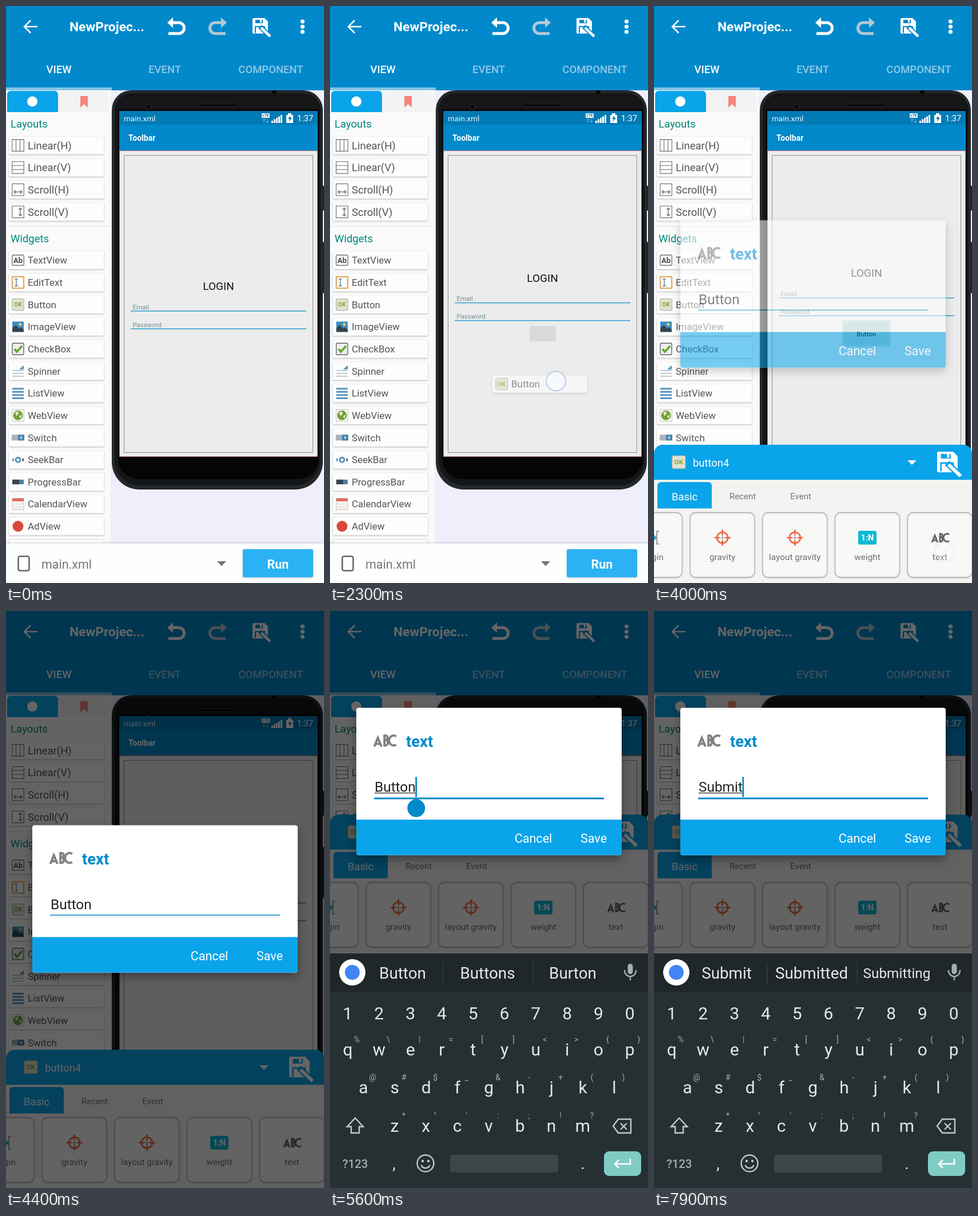
These frames come from a looping animation (556 by 1006 pixels, 8 s). An HTML page with a canvas:

```html
<!DOCTYPE html>
<html lang="en">
<head>
<meta charset="utf-8">
<title>App builder</title>
<style>
html, body { margin: 0; width: 100%; height: 100%; overflow: hidden; background: #fff; }
canvas { display: block; width: 100%; height: 100%; }
</style>
</head>
<body>
<canvas id="stage" width="556" height="1006"></canvas>
<script>
const W = 556, H = 1006, LOOP = 8000, STEP = 100;
const screen2d = document.getElementById('stage').getContext('2d');
const layer = Object.assign(document.createElement('canvas'), { width: W, height: H });
const layer2d = layer.getContext('2d');
let g = screen2d;
const BLUE = '#0189cb', SKY = '#09a4ea', GREY = '#757575';

const clamp = v => Math.max(0, Math.min(1, v));
const span = (t, from, ms) => clamp((t - from) / ms);
const easeOut = p => 1 - (1 - p) ** 2;
const easeInOut = p => p * p * (3 - 2 * p);
const mix = (a, b, p) => a + (b - a) * p;

function box(x, y, w, h, fill, r = 0, stroke, lw = 1) {
  g.beginPath();
  g.roundRect(x, y, w, h, r);
  paint(fill, stroke, lw);
}
function disc(x, y, r, fill, stroke, lw = 1) {
  g.beginPath();
  g.arc(x, y, r, 0, Math.PI * 2);
  paint(fill, stroke, lw);
}
function shape(d, fill, stroke, lw = 1, x = 0, y = 0, k = 1) {
  g.save();
  g.translate(x, y);
  g.scale(k, k);
  const p = new Path2D(d);
  if (fill) { g.fillStyle = fill; g.fill(p); }
  if (stroke) { g.strokeStyle = stroke; g.lineWidth = lw; g.stroke(p); }
  g.restore();
}
function paint(fill, stroke, lw) {
  if (fill) { g.fillStyle = fill; g.fill(); }
  if (stroke) { g.strokeStyle = stroke; g.lineWidth = lw; g.stroke(); }
}
// y is the middle of the capitals
function text(s, x, y, size, color, align = 'left', weight = 400) {
  g.font = `${weight} ${size}px Roboto, sans-serif`;
  g.textAlign = align;
  g.fillStyle = color;
  g.fillText(s, x, y + size * 0.355);
  return g.measureText(s).width;
}
function shadow(color, blur, dy) {
  g.shadowColor = color;
  g.shadowBlur = blur;
  g.shadowOffsetY = dy;
}
// Draws a group as a whole, then blends it in with one opacity
function faded(alpha, draw) {
  if (alpha <= 0) return;
  g = layer2d;
  g.clearRect(0, 0, W, H);
  draw();
  g = screen2d;
  g.globalAlpha = alpha;
  g.drawImage(layer, 0, 0);
  g.globalAlpha = 1;
}
function touch(x, y, alpha, r = 17) {
  faded(alpha, () => disc(x, y, r, '#f8faff', '#b4c6ea', 2));
}

function abc(x, y, k, color) {
  shape('M1.5 23L8 7L14.5 23M4 18H12M20 1V23M20 3H22C27 3 27 11 22 11H20M22 11C27.5 11 27.5 21 22 21H20M41.5 4.5A8.5 9 0 1 0 41.5 19.5', null, color, 4, x, y, k);
}
function floppy(x, y, k, back) {
  shape('M2 0H21L27 6V27H2Q0 27 0 25V2Q0 0 2 0Z', '#fff', null, 1, x, y, k);
  shape('M5 3H18V9H5Z', back, null, 1, x, y, k);
  shape('M13 3H16V8H13Z', '#fff', null, 1, x, y, k);
  shape('M5 26V15H21V26', null, back, 2, x, y, k);
  shape('M13 15L31 32', null, back, 8, x, y, k);
  shape('M15 17L31 32', null, '#fff', 4.5, x, y, k);
}
function curlArrow(x, dir, color) {
  g.save();
  g.translate(x, 0);
  g.scale(dir, 1);
  shape('M-8 29H5A9.5 9.5 0 0 1 5 48H-13', null, color, 5);
  shape('M-15 29L-5 20V38Z', color);
  g.restore();
}

function header() {
  box(0, 0, W, 147, BLUE);
  shape('M55 36H33M43 25L32 36L43 47', null, '#fff', 2.6);
  text('NewProjec...', 111, 36, 22.8, '#fff', 'left', 700);
  curlArrow(297, 1, '#fff');
  curlArrow(371, -1, '#b5c9d4');
  floppy(431, 21, 1, BLUE);
  for (const y of [27, 36, 45]) disc(518.5, y, 3.6, '#fff');
  text('VIEW', 92.5, 110, 18.5, '#fff', 'center', 500);
  text('EVENT', 277.5, 110, 18.5, '#8fc8e6', 'center', 500);
  text('COMPONENT', 463, 110, 18.5, '#8fc8e6', 'center', 500);
  box(0, 142, 185, 5, '#83c5e6');
}

// Each icon is drawn in a 22 px square
const frame = () => box(0.7, 0.7, 20.6, 20.6, '#fff', 0, '#888', 1.4);
const ICONS = {
  'Linear(H)': () => { frame(); shape('M7.5 1V21M14.5 1V21', null, '#888', 1.4); },
  'Linear(V)': () => { frame(); shape('M1 7.5H21M1 14.5H21', null, '#888', 1.4); },
  'Scroll(H)': () => { frame(); shape('M4 15H18M7 12L4 15L7 18M15 12L18 15L15 18', null, '#777', 1.5); },
  'Scroll(V)': () => { frame(); shape('M15 4V18M12 7L15 4L18 7M12 15L15 18L18 15', null, '#777', 1.5); },
  TextView: () => { box(0.7, 2, 20.6, 18, '#fafafa', 2, '#777', 1.4); text('Ab', 11, 11, 13, '#333', 'center', 500); },
  EditText: () => { box(1, 1, 20, 20, '#fff', 0, '#e3b06c', 2.5); shape('M8 5V17M5 5H11M5 17H11', null, '#5b87ad', 1.5); },
  Button: () => { box(0.7, 1, 20.6, 20, '#dfe4d2', 2, '#aeb4a3', 1.2); text('OK', 11, 11, 10.5, '#8aa43a', 'center', 700); },
  ImageView: () => { box(1, 2, 20, 18, '#3d8fc0'); disc(15, 7, 2.5, '#f5d04c'); shape('M1 20V13L7 8L13 14L16 12L21 16V20Z', '#34444e'); },
  CheckBox: () => { box(1, 1, 20, 20, '#eee', 2, '#777', 1.6); shape('M5 11L9 16L18 6', null, '#58a51e', 3.5); },
  Spinner: () => { shape('M1 10H21M1 15H21M1 20H21', null, '#a9b6bf', 1.6); shape('M21 1V8H13Z', '#4b93c3'); },
  ListView: () => shape('M1 3H21M1 8.5H21M1 14H21M1 19.5H21', null, '#5593bd', 3),
  WebView: () => { box(0.7, 0.7, 20.6, 20.6, '#fafafa', 1, '#bbb'); disc(11, 11, 8.5, '#74a238'); shape('M6 6L11 4L12 9L8 12ZM13 12L18 10L15 17Z', '#e5efcf'); },
  Switch: () => { box(0, 6, 22, 10, '#a8b2b8'); box(11, 6, 11, 10, '#4a86ad'); box(15.5, 9, 2, 4, '#fff'); },
  SeekBar: () => { disc(11, 11, 4, '#fff', '#5593bd', 3); box(1, 8.5, 2.5, 5, '#5593bd'); box(18.5, 8.5, 2.5, 5, '#555'); },
  ProgressBar: () => { box(1, 7, 20, 8, '#4d80a5'); box(1, 7, 12, 8, '#37474f'); },
  CalendarView: () => { box(1, 1, 20, 20, '#f6f3f0', 0, '#c9bdb8'); box(1, 1, 20, 5, '#e2695d'); shape('M4 11H18M4 16H18', null, '#ded6d2', 1); },
  AdView: () => disc(11, 11, 9.5, '#d8483b')
};
const NAMES = Object.keys(ICONS);

function icon(name, x, y, k = 1) {
  g.save();
  g.translate(x, y);
  g.scale(k, k);
  ICONS[name]();
  g.restore();
}
function paletteItem(name, x, y, size = 17) {
  g.save();
  shadow('rgba(0,0,0,.28)', 3, 1);
  box(x, y - 15.5, 166, 31, '#fdfdfd', 1);
  g.restore();
  icon(name, x + 5, y - 11);
  text(name, x + 33, y, size, '#555');
}
function palette() {
  box(0, 147, 183, 790, '#f9faf9');
  box(2, 148, 89, 37, SKY, [6, 6, 0, 0]);
  disc(46, 166.5, 9, '#fff');
  box(93, 149, 87, 36, '#f2f3f2', [6, 6, 0, 0]);
  shape('M130 157H143V177L136.5 171L130 177Z', '#f5857d');
  text('Layouts', 8, 205, 18.5, '#00897b');
  text('Widgets', 8, 405, 18.5, '#00897b');
  box(0, 384, 183, 1, '#e0e0e0');
  NAMES.forEach((name, i) => {
    if (i < 4) paletteItem(name, 5, 243 + i * 38.65, 18.5);
    else paletteItem(name, 5, 443.3 + (i - 4) * 38.65);
  });
  box(5, 930, 166, 10, '#fdfdfd', 1, '#ddd');
}

function phone(state) {
  box(183, 147, W - 183, 790, '#efeefb');
  box(550, 313, 6, 44, '#222', 2);
  box(550, 411, 6, 90, '#222', 2);
  box(185, 147, 369, 696, '#24282a', [34, 34, 48, 48]);
  box(190, 152, 360, 684, '#141617', [30, 30, 44, 44]);
  box(196, 180, 351, 645, '#050505', [0, 0, 36, 36]);
  box(465, 147, 8, 5, '#0a0a0a');
  disc(249, 176, 5, '#0a0a0a', '#3c3c3c');
  box(334, 171, 73, 4, '#050505', 2, '#333', 0.8);
  box(198, 183, 347, 24, '#027ab4');
  text('main.xml', 206, 196, 13.5, '#e8f4fa');
  box(447, 187, 14, 8, '#fff', 1);
  text('LTE', 454, 191, 7, '#027ab4', 'center', 700);
  shape('M451 203V197M449 199L451 197L453 199M457 197V203M455 201L457 203L459 201', null, '#8ec1dc', 1);
  for (let i = 0; i < 5; i++) box(464 + i * 4, 200 - i * 2.5, 3, 4 + i * 2.5, '#fff');
  shape('M490 190H493V187H499V190H502V204H490Z', '#fff');
  shape('M497 191L493 197H496L495 202L500 195H497Z', '#027ab4');
  text('1:37', 509, 196, 14.6, '#fff');
  box(198, 207, 347, 45, BLUE);
  text('Toolbar', 214, 230, 14, '#fff', 'left', 700);
  box(198, 252, 347, 534, '#ebeceb');
  box(198.5, 252.5, 346, 533, null, 0, '#cc7f7d');
  box(206.5, 260.5, 330, 518, null, 0, '#8f9191');

  const y = 488.5 - state.lift;
  text('LOGIN', 371.5, y, 19, '#111', 'center');
  [['Email', 36], ['Password', 67]].forEach(([label, dy]) => {
    text(label, 221.5, y + dy, 11.4, '#6f8b96');
    box(218, y + dy + 6.5, 307, 1.5, '#2b9fce');
  });
  if (state.slot) box(349, 557.5, 46, 27, '#d9dada', 1);
  if (state.button) {
    box(329, 548, 85, 46, '#b4d6d6');
    box(333, 552, 77, 38, '#abcdcd', 1);
    text('Button', 371.5, 571.5, 11.6, '#111', 'center', 500);
  }
}

function footer() {
  g.save();
  shadow('rgba(0,0,0,.2)', 3, -1);
  box(0, 937, W, 70, '#fdfefe');
  g.restore();
  box(21.5, 959.5, 19, 25, null, 3, '#666', 2.6);
  text('main.xml', 62, 973, 21.5, GREY);
  shape('M369 968H385L377 976.5Z', GREY);
  g.save();
  shadow('rgba(0,0,0,.25)', 3, 1);
  box(414, 947, 123, 49, '#2bb2f4', 3);
  g.restore();
  text('Run', 475.5, 973, 21.5, '#fff', 'center', 700);
}

function target(x, y) {
  disc(x, y, 9.5, null, '#ee6644', 2.6);
  shape('M-14 0H14M0-14V14', null, '#9a8a86', 1.2, x, y);
  shape('M-14 0H-5M5 0H14M0-14V-5M0 5V14', null, '#ee6644', 2.6, x, y);
}
function panel(y) {
  box(0, y + 40, W, 205, '#f3f4f2');
  box(0, y, W, 61, SKY, [15, 15, 0, 0]);
  icon('Button', 31, y + 18, 1.12);
  text('button4', 68, y + 31, 18.4, '#fff');
  shape('M443 27H459L451 35Z', '#fff', null, 1, 0, y);
  floppy(495, y + 12, 1.33, SKY);
  box(6, y + 65, 95, 46, SKY, [6, 6, 0, 0]);
  text('Basic', 53.5, y + 90, 18.4, '#fff', 'center');
  text('Recent', 155, y + 90, 15, GREY, 'center');
  text('Event', 256.5, y + 90, 15, GREY, 'center');
  ['margin', 'gravity', 'layout gravity', 'weight', 'text'].forEach((label, i) => {
    const x = -63.7 + i * 126.75;
    g.save();
    shadow('rgba(0,0,0,.15)', 2, 1);
    box(x, y + 118, 113, 113, '#f8f9f7', 10, '#b4b5b4', 1.3);
    g.restore();
    text(label, x + 56.5, y + 195.5, 15.4, '#6f6f6f', 'center');
  });
  shape('M-6 162H0M-3 156L3 162L-3 168', null, '#0aa3e8', 3, 0, y);
  shape('M9 151H5V173H9', null, '#999', 2, 0, y);
  target(119.7, y + 162);
  target(246.4, y + 162);
  box(357, y + 150, 32, 24, '#0bb8d4', 3);
  text('1:N', 373, y + 162, 14.5, '#fff', 'center', 700);
  abc(485, y + 153, 0.75, '#666');
}

function dialog(y, field) {
  g.save();
  shadow('rgba(0,0,0,.35)', 16, 7);
  box(46, y, 464, 257, '#fff', 4);
  g.restore();
  abc(76, y + 45.5, 0.96, '#808080');
  text('text', 133, y + 58.5, 27.3, BLUE, 'left', 700);
  const w = text(field.value, 78, y + 138, 24.4, '#222');
  if (field.focus) {
    if (field.value) box(78, y + 148, w, 1.3, '#222');
    box(77, y + 156.5, 402, 3, BLUE);
    box(77.5 + w, y + 120.5, 2.8, 35, BLUE);
  } else {
    box(77, y + 156, 402, 1.6, BLUE);
  }
  box(46, y + 195, 464, 62, SKY, [0, 0, 4, 4]);
  text('Cancel', 355.5, y + 227.5, 21.6, '#fff', 'center');
  text('Save', 461, y + 227.5, 21.6, '#fff', 'center');
  if (field.handle) {
    const x = 79 + w;
    disc(x, y + 175, 15.5, BLUE);
    shape('M0 156L11 165H-11Z', BLUE, null, 1, x, y);
  }
}

const ROWS = [
  { y: 764, x: 31, keys: 'qwertyuiop', alt: '%\\|=[]<>{}' },
  { y: 830, x: 58.5, keys: 'asdfghjkl', alt: '@#$_&-+()' },
  { y: 897, x: 113, keys: 'zxcvbnm', alt: '*"\':;!?' }
];
const PITCH = 54.8, KEY_SIZE = 30;
const WORDS = {
  S: 'S So She', Su: 'Su Sure Sunday', Sub: 'Sub Subject Subs', Subm: 'Subm Submit Submitted',
  Submi: 'Submi Submit Submission', Submit: 'Submit Submitted Submitting'
};

function keyPos(ch) {
  const row = ROWS.find(r => r.keys.includes(ch));
  return [row.x + row.keys.indexOf(ch) * PITCH, row.y];
}
function keyboard(dy, caps, value) {
  const ink = '#e4e8e8', dim = '#a5adb0';
  g.save();
  g.translate(0, dy);
  box(0, 597, W, 410, '#253033');
  box(0, 597, W, 67, '#1f2729');
  disc(39, 630, 23, '#fff');
  disc(39, 630, 13, '#4285f4');
  (WORDS[value] || 'Button Buttons Burton').split(' ').forEach((word, i) => {
    text(word, [127, 275.5, 424.5][i], 631, word.length > 9 ? 24.4 : 27.8, ink, 'center');
  });
  box(197, 612, 1, 38, '#3d474b');
  box(355, 612, 1, 38, '#3d474b');
  box(520.5, 615, 9, 18, dim, 4.5);
  shape('M515 626C515 641 535 641 535 626M525 637V644', null, dim, 2.4);

  [...(caps ? '!@#$%^&*()' : '1234567890')].forEach((ch, i) =>
    text(ch, 31 + i * PITCH, 701, KEY_SIZE, ink, 'center'));
  for (const row of ROWS) {
    [...row.keys].forEach((ch, i) => {
      const x = row.x + i * PITCH;
      text(caps ? ch.toUpperCase() : ch, x, row.y, KEY_SIZE, ink, 'center');
      text(row.alt[i], x + 16, row.y - 16.5, 14, dim, 'center');
    });
  }
  shape('M44 884L58 899H51V910H37V899H30Z', caps ? ink : null, '#c3c9ca', 2.4);
  shape('M504 886H526V910H504L495 898ZM508 893L519 904M519 893L508 904', null, '#c3c9ca', 2.4);

  text('?123', 44, 964, 20.3, dim, 'center', 500);
  text(',', 112, 963, 28, ink, 'center');
  disc(167, 963, 14.5, null, '#c3c9ca', 2.4);
  disc(162, 959, 2.2, '#c3c9ca');
  disc(172, 959, 2.2, '#c3c9ca');
  shape('M159.5 966C162 973 172 973 174.5 966', null, '#c3c9ca', 2.4);
  box(210, 948, 189, 31, '#3b4649', 4);
  text('.', 442, 963, 28, ink, 'center');
  box(479, 942, 65, 43, '#80cbc4', 9);
  shape('M525 955V964H498M505 957L498 964L505 971', null, '#fff', 2.6);
  g.restore();
}

const TYPED = [['s', 6900], ['u', 7000], ['b', 7200], ['m', 7400], ['i', 7500], ['t', 7700]];

function fieldValue(t) {
  if (t < 6800) return 'Button'.slice(0, 6 - Math.round(6 * span(t, 5900, 600)));
  return 'Submit'.slice(0, TYPED.filter(([, at]) => t >= at).length);
}
function pulse(t, from, to) {
  return t < from ? 0 : 1 - span(t, to, 200);
}

function draw(t) {
  const dropped = t >= 2400;
  const typing = t >= 5400;
  const value = fieldValue(t);

  phone({ slot: t >= 1500 && !dropped, button: dropped, lift: dropped ? 22.8 : t >= 1500 ? 14.3 : 0 });
  palette();
  header();
  footer();

  const slide = easeOut(span(t, 2500, 320));
  if (slide > 0) panel(typing ? 355 : mix(1006, 765, slide));

  // Long press on the palette entry, then drag it onto the phone
  const drag = easeInOut(span(t, 1000, 900));
  const nudge = 3 * (1 - span(t, 1800, 300));
  const fx = mix(115, 395, drag), fy = mix(516, 654, drag) + (drag ? nudge : 0);
  if (t >= 1000 && !dropped) faded(0.62, () => paletteItem('Button', fx - 111, fy + 5));
  if (t >= 500) touch(fx, fy, dropped ? 0.6 * (1 - span(t, 2300, 200)) : 0.85 * span(t, 400, 200));
  if (t >= 3800) touch(508, 952, 0.4 * pulse(t, 3800, 3900));

  faded(0.6 * span(t, 4000, 300), () => box(0, 0, W, H, '#000'));
  const rise = easeOut(span(t, 5100, 200));
  const top = mix(373.5, 168.8, rise);
  faded(span(t, 3880, 220), () => dialog(top, { value, focus: t >= 5000, handle: t >= 5000 && t < 5900 }));
  touch(175, 512, 0.7 * pulse(t, 4900, 4900));

  const shown = easeOut(span(t, 5200, 300));
  if (shown > 0) {
    keyboard(409 * (1 - shown), t >= 6600 && t < 6900, value);
    const drift = span(t, 6400, 300);
    touch(mix(515, 531, drift), mix(899, 906, drift), 0.4 * pulse(t, 5900, 6700));
    touch(36, 901, 0.6 * pulse(t, 6600, 6700), 19);
    for (const [ch, at] of TYPED) touch(...keyPos(ch), 0.6 * pulse(t, at, at), 18);
  }
}

const start = performance.now();
function tick() {
  const t = (performance.now() - start) % LOOP;
  g.clearRect(0, 0, W, H);
  draw(Math.floor(t / STEP) * STEP);
  requestAnimationFrame(tick);
}
tick();
</script>
</body>
</html>
```
